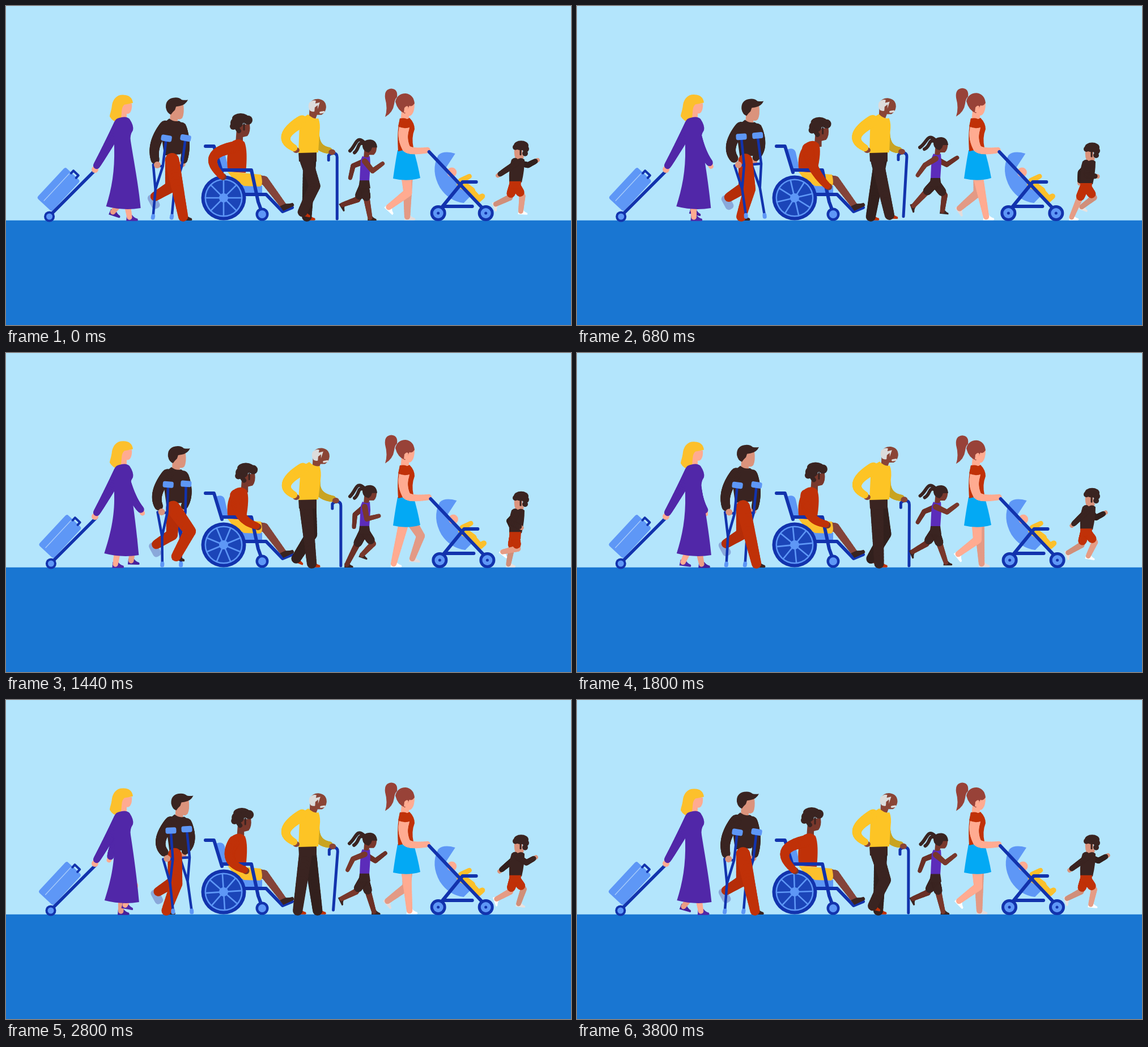
An HTML page with a canvas that plays this animation: 997x562 px, repeating every 3840 ms.

```html
<!DOCTYPE html>
<html lang="en">
<head>
<meta charset="utf-8">
<title>Walking together</title>
<style>
html, body { margin: 0; width: 100%; height: 100%; overflow: hidden; background: #b3e5fc; }
canvas { display: block; width: 997px; height: 562px; }
</style>
</head>
<body>
<canvas id="stage" width="997" height="562"></canvas>
<script>
const ctx = document.getElementById('stage').getContext('2d');
const LOOP = 3840, STEP = 40;
const NAVY = '#1233ad', BLUE = '#5e97f6', PURPLE = '#5127a8', RED = '#c03108', DARK = '#3a2421', GOLD = '#fcc02c',
  PINK = '#ffab91', TAN = '#db937c', BROWN = '#79382c', AUBURN = '#984238', UMBER = '#8a4536', GREY = '#dcdcdc';

const wave = (t, period, peak) => Math.cos((t - peak) / period * 2 * Math.PI);
const ease = u => (1 - Math.cos(Math.PI * u)) / 2;
const add = (p, q, k = 1) => [p[0] + q[0] * k, p[1] + q[1] * k];
const mix = (p, q, u) => [p[0] + (q[0] - p[0]) * u, p[1] + (q[1] - p[1]) * u];

// Walk cycle: the foot slides back on the ground, then swings forward. Returns [x, y, pitch].
function gait({ period, land, stance, front, back, y, lift, reach = 0, pitch = 0, late = 1 }) {
  return t => {
    const p = ((t - land) / period % 1 + 1) % 1;
    if (p < stance) return [front + (back - front) * p / stance, y, 0];
    const u = (p - stance) / (1 - stance), rise = Math.sqrt(Math.sin(Math.PI * u ** .6));
    const x = back + (front - back) * ease(u ** late) - reach * Math.sin(Math.PI * u) * (1 - u);
    return [x, y - lift * rise, pitch * rise * (1 - u)];
  };
}
// Hand of a swinging arm, lowest near the middle and highest in front.
const swingHand = (x, y, w, curl, tilt) => [x + 36 * w, y - curl * w * w - tilt * w];

function at(x, y, deg, draw) {
  ctx.save();
  ctx.translate(x, y);
  ctx.rotate(deg * Math.PI / 180);
  draw();
  ctx.restore();
}
function fill(color, d) { ctx.fillStyle = color; ctx.fill(new Path2D(d)); }
function line(color, w, d) {
  ctx.strokeStyle = color;
  ctx.lineWidth = w;
  ctx.lineCap = ctx.lineJoin = 'round';
  ctx.stroke(new Path2D(d));
}
function oval(color, x, y, rx, ry = rx) {
  ctx.fillStyle = color;
  ctx.beginPath();
  ctx.ellipse(x, y, rx, ry, 0, 0, 7);
  ctx.fill();
}
function box(color, x, y, w, h, r) {
  ctx.fillStyle = color;
  ctx.beginPath();
  ctx.roundRect(x, y, w, h, r);
  ctx.fill();
}
// Tapered stroke along a list of points.
function limb(color, w0, w1, pts) {
  const segs = pts.length - 1, sub = Math.ceil(18 / segs), n = segs * sub;
  ctx.strokeStyle = color;
  ctx.lineCap = 'round';
  for (let i = 0; i < n; i++) {
    const s = Math.floor(i / sub), u = (i % sub) / sub;
    ctx.lineWidth = w0 + (w1 - w0) * i / n;
    ctx.beginPath();
    ctx.moveTo(...mix(pts[s], pts[s + 1], u));
    ctx.lineTo(...mix(pts[s], pts[s + 1], u + 1 / sub));
    ctx.stroke();
  }
}
// Smooth arc from a to b through m.
function arc(a, m, b) {
  const c = add(add(m, m), mix(a, b, .5), -1), out = [];
  for (let i = 0; i <= 12; i++) out.push(mix(mix(a, c, i / 12), mix(c, b, i / 12), i / 12));
  return out;
}
// Knee or elbow between a and b for two bones of the same length.
function joint(a, b, bone, side) {
  const dx = b[0] - a[0], dy = b[1] - a[1], d = Math.hypot(dx, dy);
  const h = Math.sqrt(Math.max(0, bone * bone - d * d / 4)) * side / d;
  return add(mix(a, b, .5), [-dy, dx], h);
}
function shoe(color, [x, y, deg], size) {
  at(x, y, deg, () => {
    ctx.scale(size, size);
    fill(color, 'M-5 -4L5 -4Q8 1 15 3Q17 7 14 7L-6 7Z');
  });
}
function leg(o, hip, foot, skin, sole) {
  const knee = joint(hip, foot, o.bone, -1);
  shoe(sole, foot, o.size);
  limb(skin, o.w0, o.w1, [hip, knee, foot]);
  if (o.shorts) limb(o.shorts, o.w0 + 3, o.w0 + 2, [hip, mix(hip, knee, .72)]);
}
function wheel(x, y, r, inner) {
  oval(NAVY, x, y, r);
  oval(BLUE, x, y, inner);
}

const womanFoot = gait({ period: LOOP, land: -240, stance: .53, front: 222, back: 187, y: 372, lift: 12, reach: -6, pitch: 25 });

function woman(t) {
  const s = -wave(t, 1920, 240), swing = wave(t, LOOP, 1130);
  at(2 * s + 1, 0, 0, () => {
    at(93, 323, -47, () => {
      box(BLUE, -37, -18, 74, 36, 4);
      line('#a9cdfb', 1.3, 'M-32 -5H33');
      line(NAVY, 4, 'M36 -3H42V9H36');
    });
    line(NAVY, 5.5, 'M79 368L157 290');
    wheel(77, 371, 9.5, 5.5);
  });
  const hand = [212 + 33 * swing, 285 - 3 * Math.abs(swing)], sh = [209, 215];
  limb(PINK, 9, 8, [mix(sh, hand, .9), hand]);
  limb(PURPLE, 16, 12, arc(sh, add(mix(sh, hand, .5), [-3, 2]), mix(sh, hand, .9)));
  const o = { bone: 38, w0: 16, w1: 9, size: .95 };
  leg(o, [205, 296], womanFoot(t + LOOP / 2), '#eb9c84', '#47209c');
  leg(o, [205, 296], womanFoot(t), PINK, PURPLE);
  at(0, -s, 0, () => {
    fill(PINK, 'M205 172L222 171Q223 181 219 187Q216 190 213 189V200L199 202Z');
    fill(GOLD, 'M208 156C196 155 189 163 187 174C186 184 183 190 183 194Q188 203 199 205L203 196C205 185 203 178 209 173Q216 172 224 170C223 161 217 156 208 156Z');
  });
  oval(PINK, 157, 288, 6);
  limb(PURPLE, 20, 12, arc([201, 207], [180, 246], [160, 281]));
  const h = -2.3 * s;
  fill(PURPLE, `M200 197Q212 193 218 199Q226 211 224 219Q218 228 220 238C225 270 ${233 + h} 320 ${236 + h} 356Q${206 + h} 361 ${175 + h} 353C${185 + h} 322 192 290 191 250L190 212Z`);
}

const manFoot = gait({ period: 1920, land: 1760, stance: .635, front: 318, back: 277, y: 371, lift: 14, pitch: 20 });
const crutchTip = gait({ period: 1920, land: 760, stance: .604, front: 299, back: 259, y: 375, lift: 6, late: .8 });

// Draws a crutch and returns the place of its grip.
function crutch(pad, tip) {
  const angle = Math.atan2(pad[0] - tip[0], tip[1] - pad[1]), len = Math.hypot(pad[0] - tip[0], pad[1] - tip[1]);
  const c = Math.cos(angle), s = Math.sin(angle);
  at(...pad, angle * 180 / Math.PI, () => {
    line(NAVY, 4.5, `M0 4L2 50L-4 92L0 ${len - 4}M2 50H-15L-4 92`);
    line(BLUE, 7, `M0 ${len - 4}V${len - 1}`);
    box(BLUE, -9.5, -5.5, 19, 11, 3.5);
  });
  return [pad[0] - 8 * c - 49 * s, pad[1] - 8 * s + 49 * c];
}

function man(t) {
  const lean = wave(t, 1920, 900), b = [4.75 + 4.75 * lean, 1 + 2 * wave(t, 1920, 1100)];
  const ankle = add([263, 336], b, .6), hip = add([293, 272], b, .5), tip = crutchTip(t);
  const farPad = [318 + lean, 230 - 2.5 * lean], nearPad = [287 + 4 * lean, 231.500 - 1.5 * lean];
  const farHand = add(farPad, [-6, 46]);
  oval(TAN, farHand[0], farHand[1], 5.5);
  limb(DARK, 19, 12, arc(add([309, 215], b), add([316, 244], b), add(farHand, [3, -7])));
  at(...b, 0, () => {
    fill(TAN, 'M297 174L313 174Q315 190 311 198Q307 202 303 200V207L289 206L290 186Z');
    fill(DARK, 'M282 180Q281 165 295 162.5Q305 161 310 166Q316 167 321 166Q317 175 306 177L300 178L298 184L294 188L291 192Q284 190 282 180Z');
    fill(DARK, 'M288 199Q297 206 305 203Q319 211 320 230L308 262L279 264L272 212Z');
  });
  crutch(farPad, add(tip, [33, 0]));
  at(ankle[0] - 5, ankle[1] + 3, 62, () => box('#8aa8da', -7, -7, 27, 15, 6));
  limb('#b52d08', 24, 16, [hip, add([291, 319], b, .5), ankle]);
  leg({ bone: 50.5, w0: 25, w1: 17, size: 1 }, hip, manFoot(t), RED, DARK);
  const hand = add(nearPad, [-15 + 4 * lean, 49]);
  limb(DARK, 21, 15, arc(add([281, 213], b), add([264, 243], b), add(hand, [-1, -11])));
  oval(TAN, ...crutch(nearPad, tip), 6);
}

// Quick push on the wheel, then a slow return.
function rider(t) {
  const v = Math.max(0, (t - 760) / (LOOP - 760)), push = ease(Math.min(1, t / 760));
  const lean = push * (1 - v) ** 1.7, reach = push * (1 - v ** 2.5), k = 5.6 * lean;
  fill(BLUE, 'M370 253Q383 248 386 258L393 290L381 293Z');
  line(NAVY, 6, 'M352 247H367L381 293');
  box(BLUE, 396, 315, 56, 17, 4);
  line(NAVY, 6, 'M420 332H459L488 362L505 355');
  limb('#84443a', 18, 11, [[440, 306], [456, 307], [489, 351]]);
  at(490, 353, -25, () => fill(DARK, 'M-6 -3L5 -3Q10 0 17 1Q19 6 16 7L-4 7Z'));
  at(14 * lean, 7 * lean, 0, () => {
    fill(BROWN, 'M408 210L430 208Q432 222 426 229L418 231V241L405 243L407 215Z');
    oval(DARK, 414, 198, 15, 9);
    oval(DARK, 407, 206, 11, 10);
    oval(DARK, 427, 201, 8);
    oval(DARK, 401, 212, 6);
    line(DARK, 8, 'M406 213L411 220');
    line(DARK, 3, 'M420 208V218');
  });
  fill(RED, `M${400 + k} ${238 + k / 2}Q${412 + k} ${231 + k / 2} ${421 + k} ${240 + k / 2}Q${427 + k} 255 423 294L392 292Q386 258 ${400 + k} ${238 + k / 2}Z`);
  fill(GOLD, 'M391 292L450 297Q455 318 447 318L420 317L400 304Z');
  line(NAVY, 6, 'M381 289H433L445 345L452 364');
  oval(NAVY, 384, 338, 39.5);
  oval(BLUE, 384, 338, 33.5);
  oval('#1b45b8', 384, 338, 31);
  at(384, 338, t / LOOP * 180, () => {
    for (let i = 0; i < 4; i++) {
      line(BLUE, 2.6, 'M-32 0H32');
      ctx.rotate(Math.PI / 4);
    }
  });
  oval(BLUE, 384, 338, 8);
  wheel(452, 367, 11.5, 7);
  const hand = [380 + 63 * reach, 299 + 19 * lean ** 3], elbow = [366 + 44 * reach + 10 * lean, 267 + 20 * reach];
  oval(BROWN, hand[0] + 3, hand[1] + 2, 6);
  limb(RED, 21, 12, arc([402 + k, 249 + k / 2], elbow, hand));
}

const caneTip = gait({ period: 1920, land: 1360, stance: .604, front: 592, back: 576, y: 377, lift: 5, late: 1.6 });
const elderFoot = gait({ period: LOOP, land: 760, stance: .57, front: 552, back: 512, y: 371, lift: 9, reach: 2, pitch: 30, late: 1.6 });

function elder(t) {
  const w = wave(t, 1920, 1370), h = [2 + 5 * w, .5 + 3.2 * w], b = [h[0] * .3, h[1] * .3];
  const top = 585.5 + 5.5 * w, tip = caneTip(t), y = 258 + 2 * w, hand = [top - 9, y];
  limb('#c9a422', 15, 11, arc(add([545, 225], b), add([552, 246], b), add(hand, [-5, -3])));
  line(NAVY, 5, `M${top - 15} ${y + 14}v-8Q${top - 12} ${y + 2} ${top - 6} ${y + 2}Q${top} ${y + 2} ${top} ${y + 9}L${tip[0]} ${tip[1] - 2}`);
  oval(UMBER, ...hand, 6, 5);
  const o = { bone: 50.5, w0: 23, w1: 17, size: .95 };
  leg(o, [536, 269], elderFoot(t + LOOP / 2), '#32201d', RED);
  leg(o, [529, 269], elderFoot(t), DARK, RED);
  fill(DARK, 'M516 256H548V274H517Z');
  at(...h, 0, () => {
    fill(UMBER, 'M535 172Q540 163 551 164Q564 166 564 179Q563 188 556 192L548 192L545 200L534 196Z');
    fill(GREY, 'M534 171Q540 165 546 167L545 172L553 170L549 182Q543 189 536 185Q531 179 534 171Z');
    fill(UMBER, 'M544 179L549 175L549 188L543 192Z');
    line(GREY, 3.5, 'M554 188L560 187');
  });
  const [x, z] = b;
  fill('#fdc425', `M${533 + x} ${191 + z}Q${542 + x} ${200 + z} ${551 + x} ${198 + z}Q${555 + x} ${208 + z} ${553 + x} ${222 + z}L551 258L516 259L${518 + x} ${200 + z}Z`);
  oval(UMBER, 512, 254, 6, 5);
  limb('#fdc425', 21, 12, arc(add([522, 203], b), add([494, 229], b, .7), [508, 250]));
}

const girlFoot = gait({ period: 1920, land: -100, stance: .31, front: 651, back: 600, y: 373, lift: 23, reach: 18, pitch: 90, late: 1.6 });
const girlHand = t => swingHand(636, 306, wave(t, 1920, 1720), 25, 16);

function girl(t) {
  const b = [0, -2 + 3 * wave(t, 960, 170)], hip = add([632, 316], b), sh = add([633, 274], b);
  const o = { bone: 28, w0: 13, w1: 8, size: .72, shorts: DARK };
  const arm = (color, hand) => limb(color, 10, 7, [sh, joint(sh, hand, 22, 1), hand]);
  arm('#6b3026', girlHand(t + 960));
  leg(o, hip, girlFoot(t + 960), '#6b3026', DARK);
  leg(o, hip, girlFoot(t), BROWN, DARK);
  at(...b, 0, () => {
    const s = 2 * wave(t, 960, 240);
    line(DARK, 6, `M632 241C618 228 618 246 ${607 + s} ${256 + s}M630 243C620 240 624 252 ${615 + s} ${259 + s}`);
    fill(BROWN, 'M633 246H654Q655 258 649 263L641 263L640 270L631 269Z');
    fill(DARK, 'M629 248Q629 236 643 236Q654 237 655 250L646 250L644 255L640 259Q630 257 629 248Z');
    fill('#5c2cba', 'M629 265Q637 270 642 265L643 280L641 310H624Q625 285 626 272Z');
    fill(DARK, 'M624 308H641L643 322H622Z');
  });
  arm(BROWN, girlHand(t));
}

const motherFoot = gait({ period: 1920, land: 640, stance: .46, front: 724, back: 680, y: 371, lift: 17, reach: 16, pitch: 70, late: 1.6 });

function mother(t) {
  const o = { bone: 42, w0: 19, w1: 10, size: .9 }, s = wave(t, 1920, 1400);
  leg(o, [709, 287], motherFoot(t + 960), '#e39a85', '#e3dcdc');
  leg(o, [705, 287], motherFoot(t), PINK, '#fff');
  fill('#03a9f4', 'M691 254L718 250Q726 275 731 303Q708 310 683 304Q687 275 691 254Z');
  at(0, -.6 * wave(t, 960, 520), 0, () => {
    fill(AUBURN, 'M690 160Q692 146 680 145Q667 146 669 162Q674 180 669 195Q683 187 685 172Q686 163 690 160Z');
    fill(PINK, 'M706 174L721 171Q721 186 716 191Q713 194 711 193V203L696 204L698 184Z');
    fill(AUBURN, 'M687 168Q690 154 705 153.5Q719 155 721 171Q716 178 712 175L709 181L704 189Q691 184 687 168Z');
    fill(PINK, 'M703 179Q708 173 710 178L707 188L702 187Z');
  });
  fill(RED, 'M695 198Q704 203 712 197Q721 206 721 217Q715 232 719 250L692 256Q690 225 693 210Z');
  limb(PINK, 18, 10, arc([703, 214], [701, 232], [706, 250]).concat(arc([706, 250], [718, 255], [744 + 2 * s, 254])));
  fill(RED, 'M695 198Q706 196 710 201L714 213Q703 218 692 212Z');
}

function stroller(t) {
  at(2.4 * wave(t, 1920, 1400), 0, 0, () => {
    fill(BLUE, 'M793 260Q772 254 763 263Q749 290 766 320Q782 344 808 347L822 333L776 286Z');
    oval(PINK, 787, 293, 8.5);
    limb(GOLD, 15, 13, [[803, 313], [822, 326]]);
    limb(GOLD, 10, 8, [[803, 308], [818, 300]]);
    limb(GOLD, 13, 9, [[820, 326], [834, 340], [841, 335]]);
    line(NAVY, 6, 'M747 257L843 358M830 310H806L765 360M772 353H823');
    for (const x of [763, 847]) {
      wheel(x, 365, 14, 9);
      oval(NAVY, x, 365, 2.5);
    }
  });
}

const boyFoot = gait({ period: 1920, land: 130, stance: .3, front: 911, back: 871, y: 372, lift: 24, reach: 16, pitch: 90, late: 1.6 });
const boyHand = t => swingHand(903, 312, wave(t, 1920, 60), 28, 14);

function boy(t) {
  const b = [1, 3 + 3.3 * wave(t, 960, 440)], hip = add([896, 312], b), sh = add([901, 276], b);
  const o = { bone: 27, w0: 13, w1: 8.5, size: .78, shorts: RED };
  const arm = (color, hand) => {
    const elbow = joint(sh, hand, 19.5, 1), cuff = mix(elbow, hand, .75);
    limb(TAN, 7, 7, [cuff, hand]);
    limb(color, 11, 9, [sh, elbow, cuff]);
  };
  arm('#32201d', boyHand(t));
  leg(o, hip, boyFoot(t + 960), '#d08f7a', '#eae2df');
  leg(o, hip, boyFoot(t), '#e59c85', '#fff');
  at(...b, 0, () => {
    fill(TAN, 'M896 251H910V262L913 266Q910 273 905 273L899 270Q895 265 896 251Z');
    oval(DARK, 908, 246, 13, 8.5);
    oval(DARK, 898, 249, 5);
    oval(DARK, 916, 252, 6);
    oval(DARK, 915, 260, 5);
    line(DARK, 3, 'M907 251V262');
    fill(DARK, 'M891 271Q897 265 902 270Q909 266 914 271Q914 290 909 311L887 310Q886 285 891 271Z');
    fill(RED, 'M887 309H908L907 322H888Z');
  });
  arm(DARK, boyHand(t + 960));
}

function frame() {
  const t = Math.floor(performance.now() % LOOP / STEP) * STEP;
  ctx.fillStyle = '#b3e5fc';
  ctx.fillRect(0, 0, 997, 562);
  ctx.fillStyle = '#1976d2';
  ctx.fillRect(0, 377.7, 997, 185);
  for (const draw of [woman, man, rider, elder, girl, mother, boy, stroller]) draw(t);
  requestAnimationFrame(frame);
}
frame();
</script>
</body>
</html>
```
